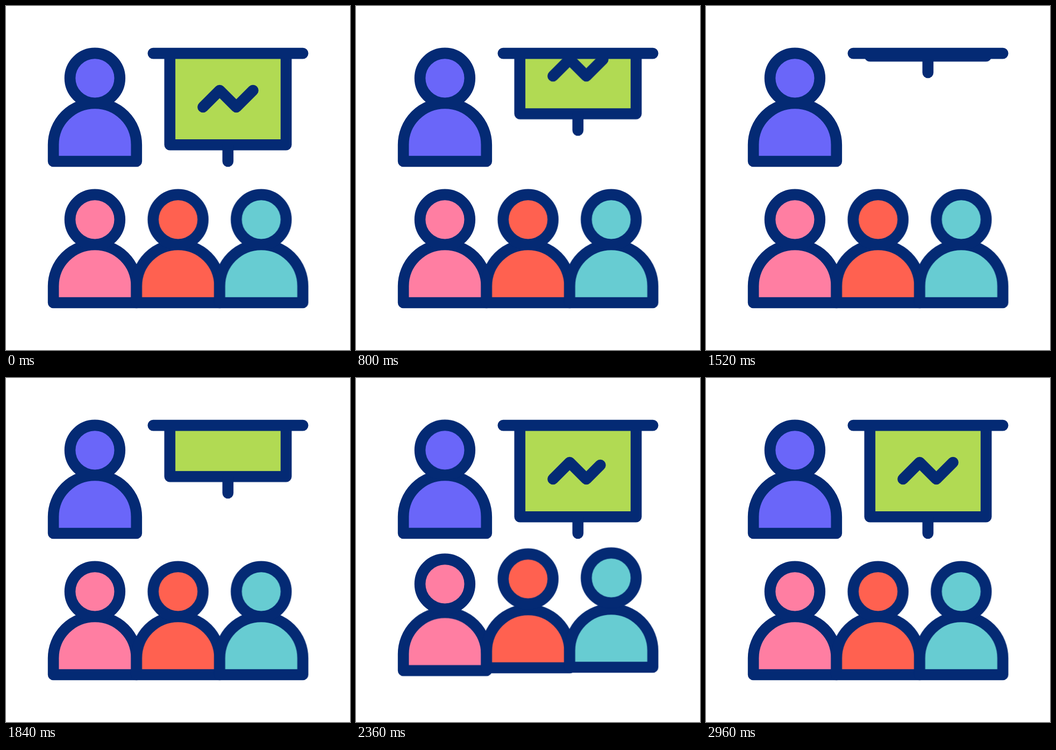
Recreate the animation shown at these times as an HTML page. Size 640 by 640 pixels, loop 3000 ms.

```html
<!DOCTYPE html>
<html lang="en">
<head>
<meta charset="utf-8">
<title>Presentation</title>
<style>
  html, body { margin: 0; width: 100%; height: 100%; overflow: hidden; background: #fff; }
  svg { display: block; width: 100vw; height: 100vh; }
  .line { stroke: #042a74; stroke-width: 20.6; stroke-linecap: round; stroke-linejoin: round; fill: none; }

  .board, .chart, .head, .body { animation: 3s linear infinite; }
  .board { animation-name: board; }
  .chart { animation-name: chart; stroke-dasharray: 1 2; }
  .head { animation-name: hop; animation-delay: var(--d); --up: -26px; }
  .body { animation-name: hop; animation-delay: var(--d); --up: -14.2px; }

  /* dips, rolls up, then rolls back down */
  @keyframes board {
    0%, 8.67% { transform: translateY(0); animation-timing-function: cubic-bezier(.33, 0, .67, 1); }
    16.7% { transform: translateY(24px); animation-timing-function: cubic-bezier(.6, 0, .4, 1); }
    38.1% { transform: translateY(-171px); }
    45.67% { transform: translateY(-171px); animation-timing-function: cubic-bezier(.58, 0, .42, 1); }
    75.5%, 100% { transform: translateY(0); }
  }
  @keyframes chart {
    0%, 40% { stroke-dashoffset: 0; animation-timing-function: step-start; }
    40.1% { stroke-dashoffset: 1.01; }
    62.7% { stroke-dashoffset: 1.01; animation-timing-function: cubic-bezier(.33, 0, .67, 1); }
    81.3%, 100% { stroke-dashoffset: 0; }
  }
  /* one tall hop, then a small one */
  @keyframes hop {
    0%, 63.4% { transform: translateY(0); animation-timing-function: cubic-bezier(.33, 0, .67, 1); }
    71.4% { transform: translateY(var(--up)); animation-timing-function: cubic-bezier(.4, 0, .8, .7); }
    78.73% { transform: translateY(0); animation-timing-function: cubic-bezier(.33, 0, .67, 1); }
    82.73% { transform: translateY(-7px); animation-timing-function: cubic-bezier(.33, 0, .67, 1); }
    90.57%, 100% { transform: translateY(0); }
  }
</style>
</head>
<body>
<svg viewBox="0 0 640 640">
  <defs>
    <clipPath id="below"><rect y="88" width="640" height="552"/></clipPath>
    <circle id="head" cx="165.4" cy="134.3" r="46.4"/>
    <path id="body" d="M88.1 289V258.2a77.35 77.35 0 0 1 154.7 0V289z"/>
  </defs>

  <g clip-path="url(#below)">
    <g class="board line">
      <path d="M304.8-150V258.2H521.2V-150" fill="#b1da53"/>
      <path d="M412.9 258.2V289"/>
      <path class="chart" pathLength="1" d="M366.5 188l31-31 31 31 31-31"/>
    </g>
  </g>
  <path class="line" d="M273.8 88.1H552.2"/>

  <g class="line" style="--d:0s" fill="#6a66f9">
    <use class="body" href="#body" fill="#6a66f9"/><use class="head" href="#head" fill="#6a66f9"/>
  </g>
  <g class="line" style="--d:.08s" transform="translate(0 263)">
    <use class="body" href="#body" fill="#ff7ea2"/><use class="head" href="#head" fill="#ff7ea2"/>
  </g>
  <g class="line" style="--d:.16s" transform="translate(154.7 263)">
    <use class="body" href="#body" fill="#ff6150"/><use class="head" href="#head" fill="#ff6150"/>
  </g>
  <g class="line" style="--d:.24s" transform="translate(309.4 263)">
    <use class="body" href="#body" fill="#67ccd2"/><use class="head" href="#head" fill="#67ccd2"/>
  </g>
</svg>
</body>
</html>
```
